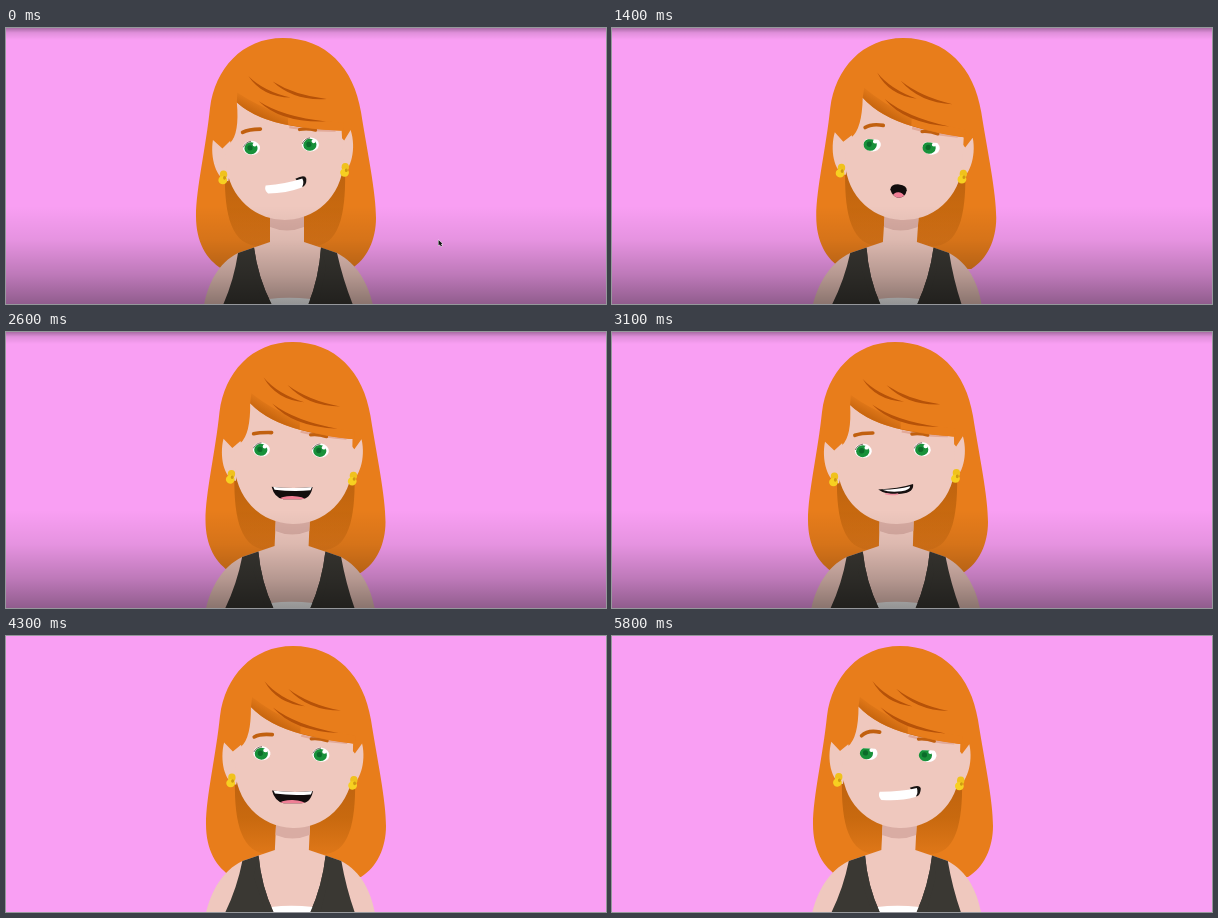
These frames come from a looping animation (600x276 px, 5.9 s). An HTML page with a canvas:

```html
<!DOCTYPE html>
<html lang="en">
<head>
<meta charset="utf-8">
<title>Talking character</title>
<style>
html, body { margin: 0; width: 100%; height: 100%; overflow: hidden; background: #f99ff3; }
canvas { display: block; width: 600px; height: 276px; }
</style>
</head>
<body>
<canvas id="stage" width="600" height="276"></canvas>
<script>
const ctx = document.getElementById('stage').getContext('2d');
const LOOP = 5900, STEP = 100;
const ORANGE = '#e87d1b', SKIN = '#efc8be', DARK = '#3a3833', BROWN = '#b65208';

// Motion keys: [time, value]
const SWAY = [[0, 0], [200, -1], [600, 8], [720, 10], [900, 5.5], [1050, 1], [1250, 9],
  [1500, 17], [1800, 11], [2100, 10], [2280, 17], [2500, 9], [2800, 11], [3100, 6],
  [3400, 3], [3700, 5.5], [3900, 1], [4200, 10], [4450, 10], [4700, 1], [4900, -1],
  [5100, -1], [5400, 7], [5600, 11], [5900, 11]];
const TILT = [[0, -.3], [900, 1], [1300, 0], [2100, -.3], [2700, 0], [3100, -1], [3700, 0], [5900, .2]];
const BOB = [[0, 0], [600, 0], [900, 2], [1300, 0], [3400, 0], [3700, 1], [4100, 0], [5900, 0]];
const LID = [[0, 0], [600, 0], [900, 4], [1300, 4], [1600, 0], [3400, 0], [3700, 6.5],
  [4000, 0], [5300, 0], [5600, 3.5], [5900, 3.5]];
const GAZE = [[0, 0], [600, 0], [900, -2], [1300, -2], [1600, 0], [5300, 0], [5600, -2], [5900, -2]];
const BROW = [[0, .4], [600, .4], [900, 1], [1300, 1], [1700, 0], [2500, 0], [3100, .2],
  [3500, .2], [3700, .8], [4100, .8], [4700, .1], [5200, .1], [5600, 1.4], [5900, 1.4]];
const VEIL = [[0, 1], [3100, 1], [3500, 0], [5900, 0]];
const SPEECH = [[0, 'grin'], [300, 'smirk'], [500, 'smile'], [800, 'wide'], [1100, 'smirk'],
  [1300, 'round'], [1500, 'smile'], [1800, 'wide'], [2000, 'smile'], [2400, 'smirk'],
  [2600, 'wide'], [2900, 'smirk'], [3400, 'smile'], [3600, 'round'], [3900, 'smile'],
  [4200, 'wide'], [4500, 'smirk'], [4700, 'grin'], [5200, 'smirk'], [5400, 'grin']];

function at(keys, t) {
  let i = 1;
  while (i < keys.length - 1 && keys[i][0] <= t) i++;
  const [t0, a] = keys[i - 1], [t1, b] = keys[i];
  const k = (t - t0) / (t1 - t0);
  return a + (b - a) * (1 - Math.cos(Math.PI * k)) / 2;
}

const hold = (keys, t) => keys.filter(k => k[0] <= t).pop()[1];

function fill(d, style) {
  ctx.fillStyle = style;
  ctx.fill(new Path2D(d));
}

function line(d, style, width) {
  ctx.strokeStyle = style;
  ctx.lineWidth = width;
  ctx.stroke(new Path2D(d));
}

function oval(x, y, rx, ry, style, turn = 0) {
  ctx.fillStyle = style;
  ctx.beginPath();
  ctx.ellipse(x, y, rx, ry, turn, 0, 7);
  ctx.fill();
}

function ramp(x0, y0, x1, y1, ...stops) {
  const g = ctx.createLinearGradient(x0, y0, x1, y1);
  stops.forEach(([p, c]) => g.addColorStop(p, c));
  return g;
}

function group(draw) {
  ctx.save();
  draw();
  ctx.restore();
}

function masked(d, draw) {
  group(() => {
    ctx.clip(new Path2D(d));
    draw();
  });
}

function backHair() {
  fill('M277 10C236 10 209 41 204 80C200 119 190 161 190 188C190 214 200 231 216 241' +
    'L345 241C361 231 370 212 370 190C370 164 361 122 355 84C348 40 320 10 277 10Z', ORANGE);
  const shade = ramp(0, 150, 0, 220, [0, '#c0640f'], [.45, '#c8690f'], [1, '#e07819']);
  fill('M219 140C218 178 222 215 250 218L310 218C336 215 340 178 339 140Z', shade);
}

function body() {
  fill('M264 180L264 214L232 225C212 235 202 256 198 277L367 277' +
    'C362 256 352 236 331 225L298 214L298 180Z', SKIN);
  fill('M264 180L264 199Q281 206 298 199L298 180Z', '#d9aca3');
  fill('M232 225L248 219.5Q252 250 266 277L217 277Q228 252 232 225Z', DARK);
  fill('M331 225L315 219.5Q313 250 302 277L347 277Q337 252 331 225Z', DARK);
  fill('M263 271Q282 268.5 305 271L302 277L266 277Z', '#fff');
  fill('M248 219.5Q252 250 266 277L258 277L244 240Z', DARK);
  fill('M315 219.5Q313 250 302 277L312 277L320 240Z', DARK);
}

function eye(x, y, lid, gaze) {
  group(() => {
    ctx.beginPath();
    ctx.rect(x - 12, y - 8 + lid, 24, 20);
    ctx.clip();
    oval(x, y, 8.6, 7, '#fff', .12);
    oval(x - .5 + gaze, y + .4, 6.6, 6, '#18913a');
    oval(x - 1.5 + gaze, y, 2.6, 2.7, '#0b6b2a');
    oval(x + 3.5 + gaze / 2, y - 3, 2.2, 1.9, '#fff');
  });
  if (lid < 2) line(`M${x - 8} ${y - 1}Q${x - 6} ${y - 6} ${x} ${y - 6.6}`, '#4d372f', .7);
}

function earring(x, y) {
  oval(x + .6, y - 3, 3.7, 4, '#f0c21c');
  oval(x - .5, y + 2.6, 4.4, 4.2, '#f7d021');
  oval(x + 1.4, y + .4, 1.5, 1.8, '#cf9a12');
}

const mouths = {
  grin() {
    fill('M294 151.5Q304 147 305 152Q305 158 301 160Z', '#171312');
    fill('M264 156.5Q284 156 301 151.5Q303 156 300 160.5Q284 165.5 266 164.5Q262 161 264 156.5Z', '#fff');
  },
  wide() {
    const d = 'M263 155Q284 157 304 154.5Q302 167 292 167L275 167.5Q266 166 263 155Z';
    fill(d, '#120d0d');
    masked(d, () => {
      fill('M264 154L304 153L302 158Q284 160 266 158Z', '#fff');
      oval(284, 168, 13, 4, '#ef7f95');
    });
  },
  smile() {
    const d = 'M262.5 148.5Q282 152 301 149.5Q298 164 282 164Q268 163 262.5 148.5Z';
    fill(d, '#120d0d');
    masked(d, () => {
      fill('M264 148L300 148L297 154.5Q282 157 267 154Z', '#fff');
      oval(283, 164, 12, 4.5, '#ee718c');
    });
  },
  smirk() {
    fill('M266 157Q286 157 301 152.5Q302 161 289 162Q274 163 266 157Z', '#15100f');
    fill('M270 157.5Q286 157.5 298 154.5Q298 158 289 159.5Q277 160.5 270 157.5Z', '#fff');
    line('M273 161.5Q279 163 286 162', '#ee8fa0', 1.5);
  },
  round() {
    const d = 'M272.5 162Q273 156.5 281 156.5Q289 157 289 162Q288 169.5 281 170Q275 169 272.5 162Z';
    fill(d, '#120d0d');
    masked(d, () => oval(281, 169, 6, 4.5, '#f07f96'));
  }
};

function streaks() {
  fill('M253 46Q267 62 294 70Q266 68 253 46Z', BROWN);
  fill('M277 53Q298 68 330 73.5Q297 74 277 53Z', BROWN);
  fill('M262 72Q285 89 328 96Q283 95 262 72Z', BROWN);
}

function head(t) {
  const lid = at(LID, t), gaze = at(GAZE, t), lift = at(BROW, t);
  fill('M214 108C210 125 215 148 227 150L234 120L231 110L223 117Z', SKIN);
  fill('M352 106C357 125 350 146 341 149L334 120L338 108L345 116Z', SKIN);
  fill('M226 133A58.5 59 0 0 0 343 133L343 106Q316 104 292 98Q258 90 240 72' +
    'Q241 103 231 112L225 117Z', SKIN);
  line('M291 99.5Q315 105 337 105.5', '#e2a998', 2.4);

  const y = 101 - lift * 2;
  ctx.lineCap = 'round';
  line(`M244 ${102.5 - lift}Q250 ${y - lift * 2.5} 262 ${y - lift}`, '#c1600f', 3.6);
  line('M301 102.5Q309 101.5 317 104', '#c1600f', 3.2);
  ctx.lineCap = 'butt';

  // Shaded lower edge of the fringe
  fill('M240 72Q258 90 292 98Q316 104 343 106L342 101Q280 92 241 62Z',
    ramp(262, 92, 271, 75, [0, '#bd5e0b'], [1, ORANGE]));
  fill('M290 97Q318 104 345 106L345 98L290 90Z', ORANGE);
  streaks();

  eye(252, 118, lid, gaze);
  eye(311, 118, lid, gaze);
  earring(222, 146);
  earring(344, 145.5);
  mouths[hold(SPEECH, t)]();
}

function veil(alpha) {
  group(() => {
    ctx.globalAlpha = alpha;
    ctx.fillStyle = ramp(0, 0, 0, 12, [0, 'rgba(0,0,0,.32)'], [.4, 'rgba(0,0,0,.1)'], [1, 'rgba(0,0,0,0)']);
    ctx.fillRect(0, 0, 600, 12);
    ctx.fillStyle = ramp(0, 178, 0, 276, [0, 'rgba(0,0,0,0)'], [.35, 'rgba(0,0,0,.08)'],
      [.7, 'rgba(0,0,0,.24)'], [1, 'rgba(0,0,0,.42)']);
    ctx.fillRect(0, 178, 600, 98);
  });
}

function pointer() {
  const d = 'M432.5 212L432.5 217.5L433.8 216.4L435 218.4L436 217.8L435 216L436.5 215.8Z';
  line(d, '#fff', 1);
  fill(d, '#111');
}

function draw(t) {
  const sway = at(SWAY, t), bob = at(BOB, t);
  const angle = (-3 + .43 * sway + at(TILT, t)) * Math.PI / 180;
  ctx.fillStyle = '#f99ff3';
  ctx.fillRect(0, 0, 600, 276);
  group(() => {
    ctx.translate(sway, bob);
    backHair();
  });
  group(() => {
    ctx.transform(1, 0, -.0046 * sway, 1, 1.47 * sway, bob * .8);
    body();
  });
  group(() => {
    ctx.translate(278 + .82 * sway, 145.5 + bob * .4);
    ctx.rotate(angle);
    ctx.translate(-283, -145.5);
    head(t);
  });
  veil(at(VEIL, t));
  if (t < 300) pointer();
}

const start = performance.now();
function tick() {
  const t = (performance.now() - start) % LOOP;
  draw(Math.floor(t / STEP) * STEP);
  requestAnimationFrame(tick);
}
tick();
</script>
</body>
</html>
```
